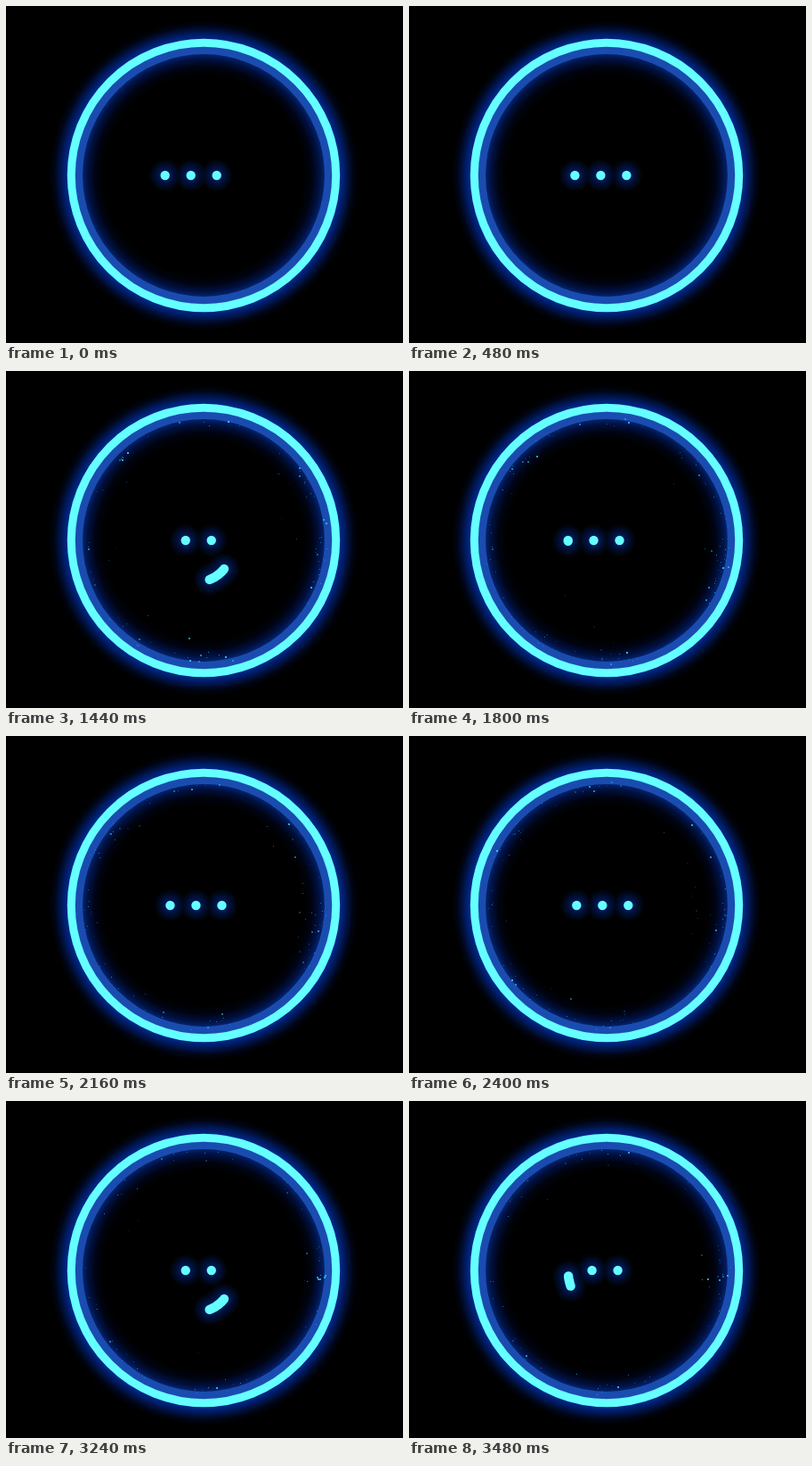
These frames come from a looping animation (446 px wide and 378 px high, 3.6 s). An HTML page with a canvas:

```html
<!DOCTYPE html>
<html lang="en">
<head>
<meta charset="utf-8">
<title>Glowing ring loader</title>
<style>
  html, body { margin: 0; width: 100%; height: 100%; overflow: hidden; background: #000; }
  canvas { display: block; }
</style>
</head>
<body>
<canvas id="stage" width="446" height="378"></canvas>
<script>
const ctx = document.getElementById('stage').getContext('2d');
const LOOP = 3600, HALF = 1800, STEP = 120;
const CX = 222, CY = 190, TAU = Math.PI * 2;
const CYAN = '#66ffff';

// Dots: the row creeps right while the last dot swings back to the front.
const ROW_X = 178.7, TRAVEL = 28.8, GAP = 29;
const SWING_FROM = 2 / 3, SWING_DROP = 46, SHUTTER = 60 / HALF;

function random(seed) {
  return () => {
    seed = (seed + 0x6D2B79F5) | 0;
    let n = Math.imul(seed ^ (seed >>> 15), 1 | seed);
    n = (n + Math.imul(n ^ (n >>> 7), 61 | n)) ^ n;
    return ((n ^ (n >>> 14)) >>> 0) / 4294967296;
  };
}

const rnd = random(29);
const EMITTERS = [0, 0.22, 1.5, 2.3, 3.05, 3.85, 4.7, 5.65];
const sparks = Array.from({ length: 270 }, () => ({
  angle: EMITTERS[Math.floor(rnd() * EMITTERS.length)] + (rnd() + rnd() - 1) * 0.42,
  born: 520 + rnd() * 3050,
  life: 500 + rnd() * 900,
  radius: 141 - rnd() * 11,
  speed: 4 + 82 * Math.pow(rnd(), 6),
  turn: (rnd() - 0.5) * 0.14,
  size: rnd() < 0.22 ? 2 : 1,
  light: 0.35 + rnd() * 0.6
}));

function circle(r, width, color) {
  ctx.beginPath();
  ctx.arc(CX, CY, r, 0, TAU);
  ctx.lineWidth = width;
  ctx.strokeStyle = color;
  ctx.stroke();
}

function drawRing() {
  const glow = ctx.createRadialGradient(CX, CY, 112, CX, CY, 174);
  const stops = [
    [112, '#000000'], [122, '#000412'], [130, '#001040'], [136, '#04236c'],
    [153, '#00298a'], [158, '#001d68'], [163, '#00103c'], [168, '#000514'], [174, '#000000']
  ];
  for (const [r, color] of stops) glow.addColorStop((r - 112) / 62, color);
  ctx.fillStyle = glow;
  ctx.fillRect(0, 0, 446, 378);
  circle(140.2, 8.6, '#1a4cb0');
  circle(148.7, 9, CYAN);
}

function drawSparks(t) {
  for (const s of sparks) {
    const age = t - s.born;
    if (age < 0 || age > s.life) continue;
    const sec = age / 1000;
    const r = s.radius - s.speed * sec;
    const a = s.angle + s.turn * sec;
    ctx.globalAlpha = s.light * Math.min(1, 2 * (1 - age / s.life));
    ctx.fillStyle = s.size > 1 ? '#35c8f5' : '#2196dc';
    ctx.fillRect(Math.round(CX + r * Math.cos(a)), Math.round(CY + r * Math.sin(a)), s.size, s.size);
  }
  ctx.globalAlpha = 1;
}

const ease = q => q < 0.5 ? 2 * q * q : 1 - 2 * (1 - q) * (1 - q);

function swingPoint(p) {
  const start = ROW_X + 2 * GAP + TRAVEL * SWING_FROM;
  const q = Math.min(1, Math.max(0, (p - SWING_FROM) / (1 - SWING_FROM)));
  const a = Math.PI * ease(q);
  const rx = (start - ROW_X) / 2;
  return [ROW_X + rx + rx * Math.cos(a), CY + SWING_DROP * Math.sin(a)];
}

function dotPaths(p) {
  const x = ROW_X + TRAVEL * p;
  const paths = [0, 1].map(i => [[x + i * GAP, CY]]);
  if (p <= SWING_FROM) {
    paths.push([[x + 2 * GAP, CY]]);
  } else {
    // The swinging dot is smeared over the shutter time.
    paths.push(Array.from({ length: 9 }, (_, i) => swingPoint(p + SHUTTER * (i / 8 - 0.5))));
  }
  return paths;
}

function strokePath(points, width, color) {
  ctx.beginPath();
  ctx.moveTo(...points[0]);
  for (const pt of points) ctx.lineTo(pt[0], pt[1] + 0.01);
  ctx.lineWidth = width;
  ctx.strokeStyle = color;
  ctx.stroke();
}

function drawDots(p) {
  const paths = dotPaths(p);
  ctx.lineCap = ctx.lineJoin = 'round';
  ctx.globalCompositeOperation = 'lighten';
  for (let r = 18; r >= 5; r--) {
    const k = Math.pow((19 - r) / 14, 1.1);
    const color = `rgb(0,${Math.round(26 * k)},${Math.round(92 * k)})`;
    for (const path of paths) strokePath(path, r * 2, color);
  }
  ctx.globalCompositeOperation = 'source-over';
  for (const path of paths) strokePath(path, 10.4, CYAN);
}

function draw(t) {
  drawRing();
  drawSparks(t);
  drawDots((t <= HALF ? t : t - HALF) / HALF);
}

const began = performance.now();
function tick() {
  const t = (performance.now() - began) % LOOP;
  draw(Math.floor(t / STEP) * STEP);
  requestAnimationFrame(tick);
}
tick();
</script>
</body>
</html>
```
